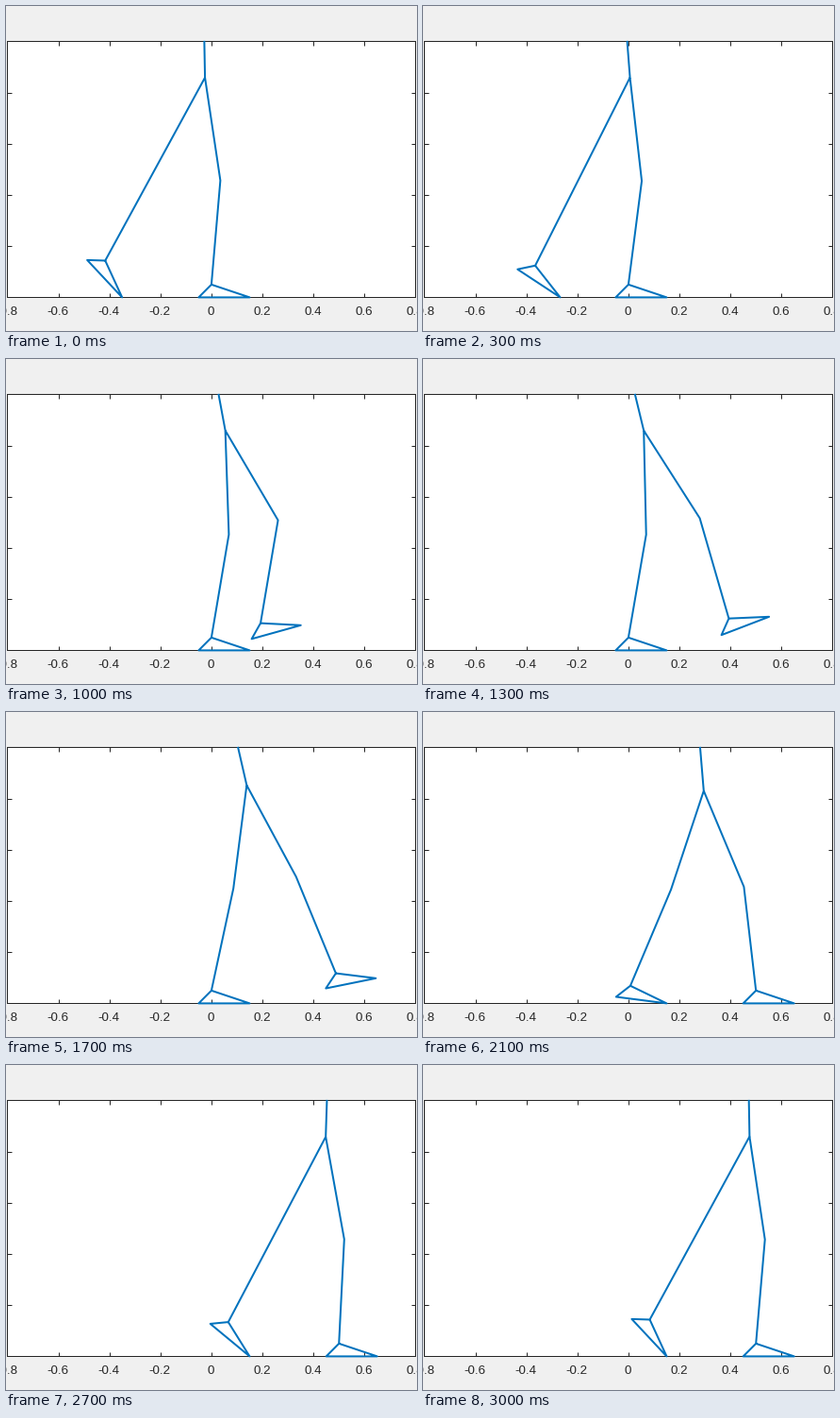
A matplotlib script that plays this animation: 436x344 px, repeating every 3.1 s.

```python
import numpy as np
import matplotlib.pyplot as plt
from matplotlib.animation import FuncAnimation

W, H, DPI = 436, 344, 100
PX = 72 / DPI                       # one pixel in points
LEFT, RIGHT, TOP, BOTTOM = 1.4, 434.4, 37.4, 308.4
INK, BLUE = "#262626", "#0072bd"
FRAMES, STEP_MS = 31, 100

THIGH, SHANK = 0.4065, 0.408
HEEL, SOLE, ANKLE = 0.05, 0.2, 0.05  # foot: heel to ankle, length, height
CYCLE, STRIDE = 30, 0.5              # steps and distance until the legs swap
LIFT_OFF, LANDING = 6, 21            # swing toe leaves and meets the ground
HEEL_OFF = 18                        # stance heel starts to rise
TIP = 46.8                           # pitch of the rear foot at the swap


def ramp(i, start, end):
    return np.clip((i - start) / (end - start), 0, 1)


def wave(i, mean, cos1, sin1, cos2, sin2):
    """Periodic sway over one cycle, two harmonics."""
    a = 2 * np.pi * i / CYCLE
    return (mean + cos1 * np.cos(a) + sin1 * np.sin(a)
            + cos2 * np.cos(2 * a) + sin2 * np.sin(2 * a))


def hip_at(i):
    x = STRIDE * i / CYCLE + wave(i, -.0721, .0695, -.0255, -.0226, -.0063)
    dip = .0285 * np.exp(-((i - LANDING) / 3.3) ** 2)
    return np.array([x, .8585 - dip])


def lean_at(i):
    return wave(i, -.11, .1187, -.0576, -.027, -.0226)


def stance_foot(i):
    s = ramp(i, HEEL_OFF, CYCLE)
    return np.array([.15, 0]), TIP * s * s * (3 - 2 * s)


def swing_foot(i):
    s = ramp(i, 0, LANDING)
    x = -.35 + 2 * STRIDE * (1 - (1 - s ** 2.1) ** 5.1)
    y = .132 * np.sin(np.pi * ramp(i, LIFT_OFF, LANDING))
    pitch = TIP * (1 - s) ** .77 * np.cos(np.radians(12.3 * i))
    return np.array([x, y]), pitch


def foot(toe, pitch):
    """Ankle and heel of a foot tipped about its toe, in degrees."""
    a = np.radians(pitch)
    along = np.array([np.cos(a), -np.sin(a)])
    up = np.array([np.sin(a), np.cos(a)])
    heel = toe - SOLE * along
    return heel + HEEL * along + ANKLE * up, heel


def knee(hip, ankle):
    """Knee bent forward; a leg at full stretch stays straight."""
    leg = ankle - hip
    dist = np.hypot(*leg)
    u = leg / dist
    forward = np.array([-u[1], u[0]])
    if dist >= THIGH + SHANK:
        return hip + leg * THIGH / (THIGH + SHANK)
    a = (THIGH ** 2 - SHANK ** 2 + dist ** 2) / (2 * dist)
    return hip + a * u + np.sqrt(max(THIGH ** 2 - a * a, 0)) * forward


def leg_path(hip, toe, pitch):
    ankle, heel = foot(toe, pitch)
    return [hip, knee(hip, ankle), ankle, heel, toe, ankle]


def pose(i):
    hip = hip_at(i)
    torso = hip + (1.002 - hip[1]) * np.array([lean_at(i), 1])
    gap = np.full(2, np.nan)
    return np.array([torso, *leg_path(hip, *stance_foot(i)), gap,
                     *leg_path(hip, *swing_foot(i))]).T


fig = plt.figure(figsize=(W / DPI, H / DPI), dpi=DPI, facecolor="#f0f0f0")
ax = fig.add_axes([LEFT / W, 1 - BOTTOM / H, (RIGHT - LEFT) / W, (BOTTOM - TOP) / H])
ax.set(xlim=(-.8, .8), ylim=(0, 1), facecolor="white")
ticks = np.round(np.arange(-4, 5) * .2, 1)
ax.set_xticks(ticks)
ax.set_yticks(np.arange(6) * .2)
ax.tick_params(direction="in", length=4.5 * PX, width=PX, color=INK, top=True,
               right=True, labelbottom=False, labelleft=False)
for spine in ax.spines.values():
    spine.set(linewidth=PX, color=INK)

for v in ticks:
    x = LEFT + (v + .8) / 1.6 * (RIGHT - LEFT) - .5
    fig.text(x / W, 1 - 327 / H, f"{v + 0:g}", ha="center", va="baseline",
             family="Liberation Sans", size=13.33 * PX, color=INK)

walker, = ax.plot([], [], color=BLUE, lw=2 * PX, solid_joinstyle="round",
                  solid_capstyle="butt", clip_on=False, zorder=3)


def draw(i):
    walker.set_data(*pose(i))
    return walker,


anim = FuncAnimation(fig, draw, frames=FRAMES, interval=STEP_MS,
                     repeat=True, repeat_delay=0)
plt.show()
```
